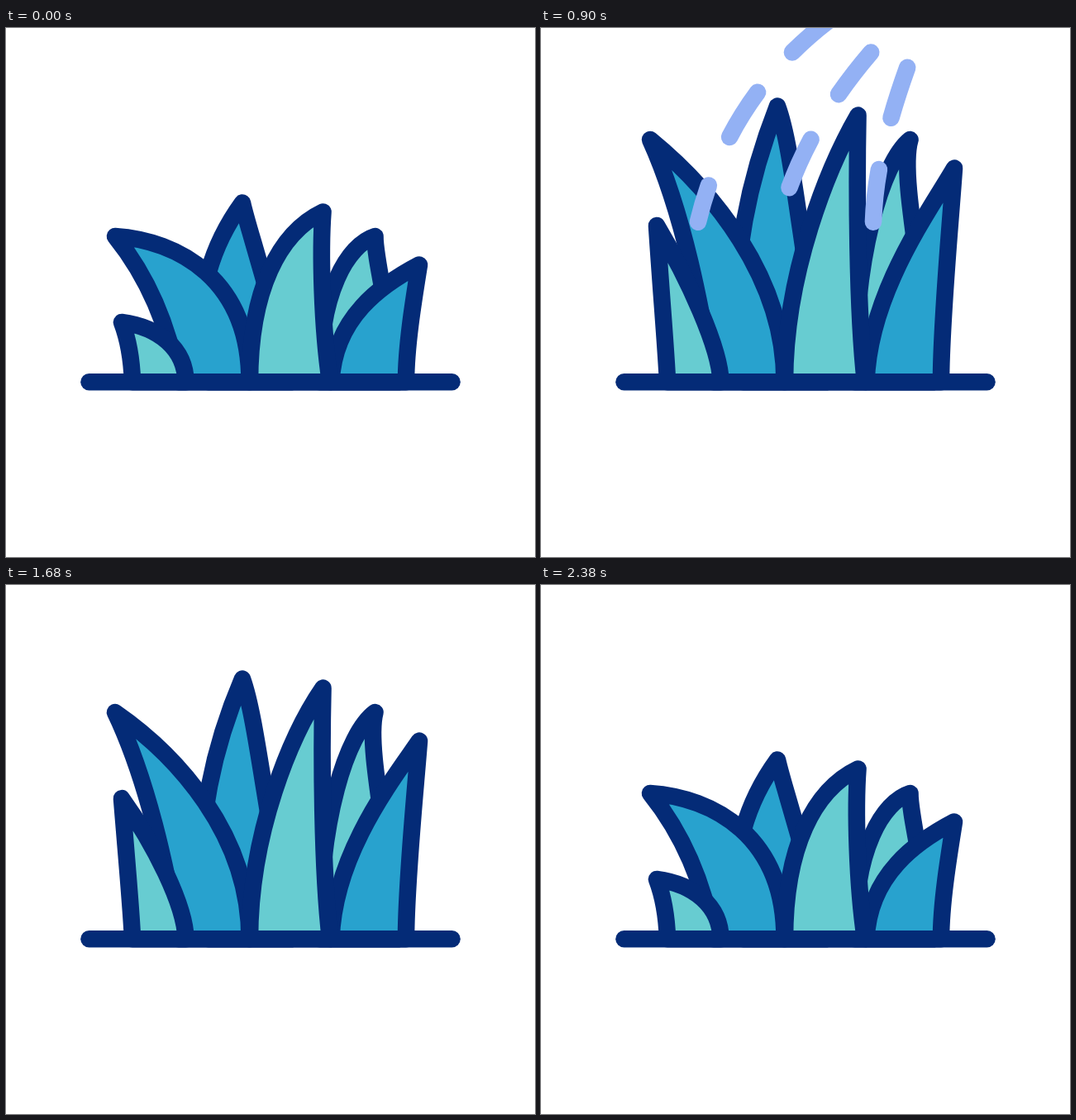
An HTML page with a canvas that plays this animation: 640 px wide and 640 px high, repeating every 2.4 s.

```html
<!DOCTYPE html>
<html>
<head>
<meta charset="utf-8">
<title>Watered grass</title>
<style>
  html, body { margin: 0; width: 100%; height: 100%; overflow: hidden; background: #fff; }
  canvas { display: block; width: 640px; height: 640px; }
</style>
</head>
<body>
<canvas id="stage" width="640" height="640"></canvas>
<script>
const ctx = document.getElementById('stage').getContext('2d');
const LOOP = 2400, GROUND = 428.3, LIFT = 123, LINE = 20.6;
const NAVY = '#042b77', BLUE = '#28a2ce', TEAL = '#67ccd1', WATER = '#93b1f4';

// An edge runs from its base on the ground to the tip of the blade.
// The neck handle drifts sideways while the blade grows.
const edge = (base, foot, neck, drift = 0) => ({ base, foot, neck, drift });

// Sway is the share of the lift that the neck handles follow.
const blades = [
  { fill: BLUE, tip: [286, 211.5], sway: .8,
    left: edge(245, [218, 325], [258, 250], 4), right: edge(345, [312, 295], [292, 240], 14) },
  { fill: TEAL, tip: [446.5, 252], sway: .85,
    left: edge(380, [378, 320], [414, 262], -2), right: edge(475, [458, 320], [446, 275], -12) },
  { fill: BLUE, tip: [132, 252], sway: .53,
    left: edge(209, [194, 345], [161, 288], 13), right: edge(294.5, [295, 304], [208, 257], -3) },
  { fill: TEAL, tip: [140, 356], sway: .5,
    left: edge(153, [152, 398], [148, 377], -3), right: edge(217.5, [217, 388], [185, 362], -7) },
  { fill: BLUE, tip: [500, 286.5], sway: .75,
    left: edge(393.5, [397, 350], [455, 310], 15), right: edge(484, [484, 385], [493, 330], 2) },
  { fill: TEAL, tip: [383.5, 222.5], sway: .68,
    left: edge(295, [295, 318], [330, 248], 18), right: edge(392, [382, 360], [380, 270], 2) }
];

// Dense jets: tail and head are arc lengths, rate is the speed relative to the left one.
const jets = [
  { rate: 1, tail: 164, head: 365, path: arc(352, -12, 240, 72, 190, 185, 178, 306) },
  { rate: .829, tail: 199, head: 359, path: arc(442, -16, 342, 82, 281, 195, 277, 310) },
  { rate: .726, tail: 188, head: 324, path: arc(468, -16, 426, 86, 386, 205, 408, 310) }
];

// Sparse first splashes.
const splashes = [
  { lead: 217, path: arc(575, -15, 380, 45, 216, 145, 205, 255) },
  { lead: 118, path: arc(438, -30, 370, 55, 290, 175, 291, 300) },
  { lead: 167, path: arc(492, -12, 458, 80, 376, 270, 404, 385) }
];

function arc(x, y, ...curve) {
  const path = new Path2D();
  path.moveTo(x, y);
  path.bezierCurveTo(...curve);
  return path;
}

// Symmetric cubic-bezier(.833, 0, .167, 1).
function ease(x) {
  const a = .833;
  if (x <= 0) return 0;
  if (x >= 1) return 1;
  let lo = 0, hi = 1;
  for (let i = 0; i < 24; i++) {
    const s = (lo + hi) / 2, r = 1 - s;
    if (3 * r * r * s * a + 3 * r * s * s * (1 - a) + s * s * s < x) lo = s; else hi = s;
  }
  return lo * lo * (3 - 2 * lo);
}

function drawBlade({ fill, tip, sway, left, right }, grow) {
  const rise = grow * LIFT;
  const foot = e => [e.foot[0], e.foot[1] - rise * (sway - .5)];
  const neck = e => [e.neck[0] + e.drift * grow, e.neck[1] - rise * sway];
  ctx.beginPath();
  ctx.moveTo(left.base, GROUND);
  ctx.bezierCurveTo(...foot(left), ...neck(left), tip[0], tip[1] - rise);
  ctx.bezierCurveTo(...neck(right), ...foot(right), right.base, GROUND);
  ctx.closePath();
  ctx.fillStyle = fill;
  ctx.fill();
  ctx.stroke();
}

// Dashes start at the tail and are cut off at the head.
function drawDashes(path, tail, head, dash, gap) {
  for (let s = tail; s < head; s += dash + gap) {
    const from = Math.max(0, s), to = Math.min(s + dash, head);
    if (to <= from) continue;
    ctx.setLineDash([to - from, 5000]);
    ctx.lineDashOffset = -from;
    ctx.stroke(path);
  }
  ctx.setLineDash([]);
}

function drawSplashes(t) {
  const tail = 1.6 * (t - 620);
  const head = 222 - 430 * (Math.max(0, 700 - t) / 600) ** 2;
  splashes.forEach(s => drawDashes(s.path, s.lead + tail, s.lead + head, 24, 160));
}

// The head slows down towards the grass while the tail speeds up to catch it.
function drawJets(t) {
  const head = 4 - 220 * (Math.max(0, 1320 - t) / 700) ** 2.3;
  const age = t - 620;
  const tail = -263 + .34 * age + 59 * (Math.max(0, age) / 600) ** 4;
  jets.forEach(j => drawDashes(j.path, j.tail + j.rate * tail, j.head + j.rate * head, 64, 64));
}

function draw(t) {
  ctx.fillStyle = '#fff';
  ctx.fillRect(0, 0, 640, 640);
  ctx.lineWidth = LINE;
  ctx.lineCap = ctx.lineJoin = 'round';

  ctx.strokeStyle = NAVY;
  const grow = ease((t - 60) / 1140) * (1 - ease((t - 1160) / 1240));
  blades.forEach(b => drawBlade(b, grow));
  ctx.beginPath();
  ctx.moveTo(100.5, GROUND);
  ctx.lineTo(539.5, GROUND);
  ctx.stroke();

  ctx.strokeStyle = WATER;
  drawSplashes(t);
  drawJets(t);
}

const start = performance.now();
function tick(now) {
  draw(Math.max(0, now - start) % LOOP);
  requestAnimationFrame(tick);
}
draw(0);
requestAnimationFrame(tick);
</script>
</body>
</html>
```
